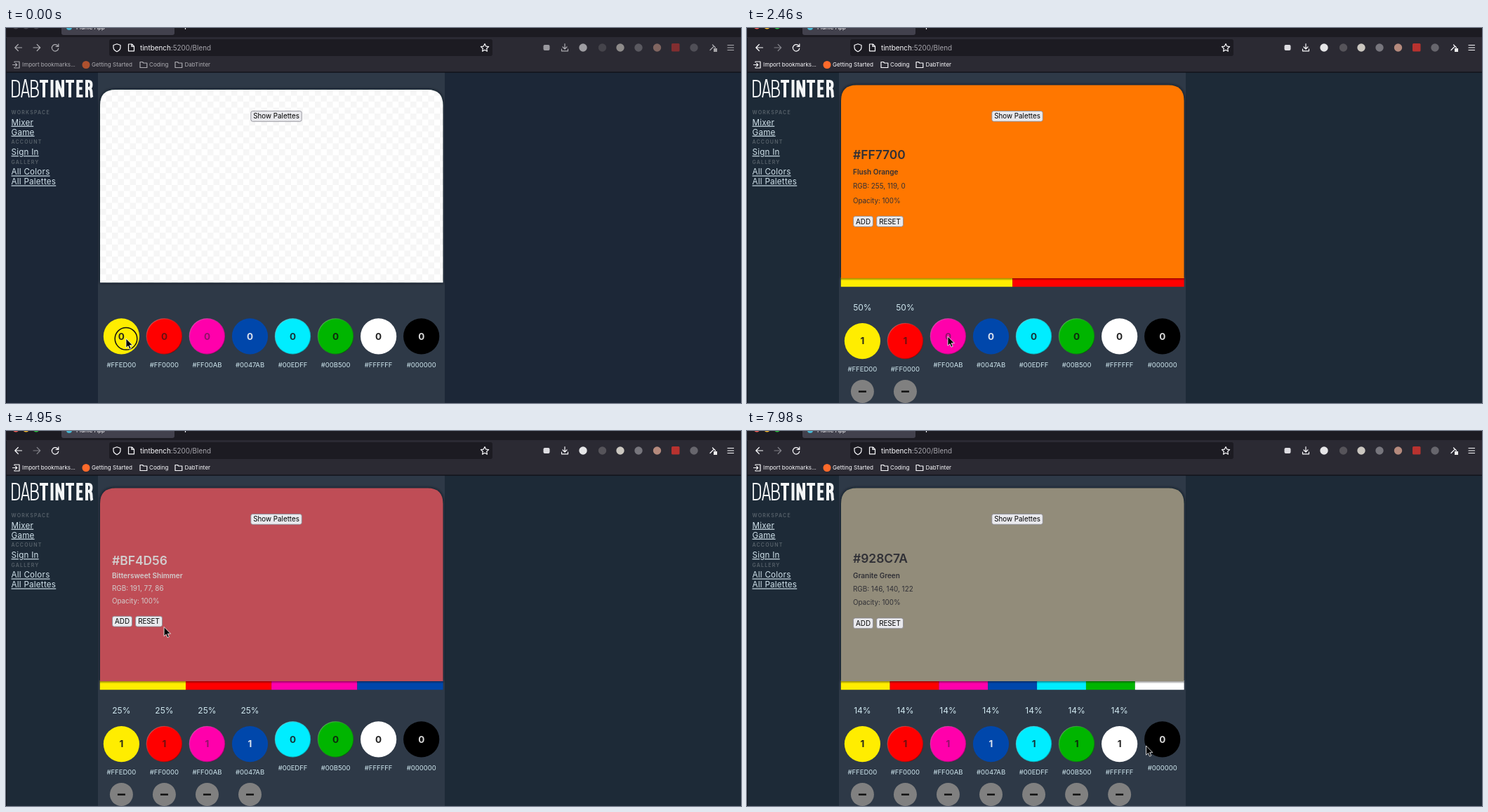
Animation, 1047 px wide and 535 px high, one loop 8 s. Source, as an HTML page:

```html
<!DOCTYPE html>
<html lang="en">
<head>
<meta charset="utf-8">
<title>Color mixer</title>
<style>
  html, body { margin: 0; width: 100%; height: 100%; overflow: hidden; background: #1d2a37; }
  svg { display: block; width: 1047px; height: 535px; font-family: Inter, "Open Sans", sans-serif; }
  .line { fill: none; stroke: #fbfbfe; stroke-width: 1.2; stroke-linecap: round; stroke-linejoin: round; }
  .link { text-decoration: underline; text-decoration-thickness: 1px; text-underline-offset: 2px; letter-spacing: .25px; }
</style>
</head>
<body>
<svg id="stage" viewBox="0 0 1047 535">
  <defs>
    <pattern id="checks" x="134" y="88" width="17" height="17" patternUnits="userSpaceOnUse">
      <path fill="#fff" d="M0 0h17v17H0z"/>
      <path fill="#f6f6f6" d="M0 0h8.5v8.5H0zM8.5 8.5h8.5v8.5H8.5z"/>
    </pattern>
    <linearGradient id="rim" x1="0" y1="0" x2="1" y2="1">
      <stop offset=".1" stop-color="#bbb" stop-opacity=".4"/>
      <stop offset=".5" stop-color="#555" stop-opacity=".2"/>
      <stop offset=".9" stop-color="#000" stop-opacity=".35"/>
    </linearGradient>
    <linearGradient id="shade" x1="0" y1="0" x2="0" y2="1">
      <stop offset="0" stop-opacity=".4"/>
      <stop offset="1" stop-opacity="0"/>
    </linearGradient>
    <filter id="soft" x="-5%" y="-5%" width="110%" height="110%">
      <feGaussianBlur stdDeviation="2"/>
    </filter>
  </defs>
  <rect id="page" y="63" width="1047" height="472"/>
  <path fill="#2e3947" d="M131 63h494v472H131z"/>
  <g id="chrome"></g>
  <g id="side"></g>
  <g id="mixer"></g>
  <circle id="ring" cx="171" cy="443.3" r="15.8" fill="none" stroke="#111" stroke-width="1.5"/>
  <g id="pointer">
    <path id="arrow" d="M0 0V13.2L3 10.6 5 15.2 7.2 14.2 5.2 9.7H9.4Z" fill="#000" stroke="#fff" stroke-width=".8"/>
    <path id="beam" d="M1 0q2.5 0 3 1.5.5-1.5 3-1.5M4 1.5v9M1 12q2.5 0 3-1.5.5 1.5 3 1.5M2.5 6.5h3" fill="none" stroke="#eee" stroke-width="1.2"/>
  </g>
</svg>
<script>
const LOOP = 8000;
const $ = id => document.getElementById(id);

const colors = ['FFED00', 'FF0000', 'FF00AB', '0047AB', '00EDFF', '00B500', 'FFFFFF', '000000'];
const digits = ['#2b2a18', '#6b1010', '#8f1268', '#dce3ee', '#16343a', '#0d2b0d', '#222', '#d8d8d8'];

// time, number of colors in the mix, palette already stored
const mixes = [
  [0, 0], [390, 1], [1710, 2], [2550, 3], [3270, 4], [5190, 4, true],
  [6210, 5], [7050, 6], [7620, 7]
];

// time, color name, row centers: hex, name, rgb, opacity, buttons
const names = [
  [0, 'Turbo', 180.5, 205, 225.5, 246, 276],
  [1950, 'Flush Orange', 180.5, 205, 225.5, 246, 276],
  [2790, 'Sunset Orange', 180.5, 205.5, 225.5, 245.5, 275.5],
  [3510, 'Bittersweet Shimmer', 184.5, 206.5, 224.3, 242, 271.7],
  [6450, 'Bazaar', 181.5, 206, 225.3, 244.5, 274.4],
  [7290, 'Pablo', 181.7, 206, 225.2, 244.3, 274.3],
  [7860, 'Granite Green', 182, 206, 225.2, 244.2, 274.3]
];

// time, x, y of the pointer tip
const path = [
  [0, 171, 443], [600, 171, 443], [1050, 226, 440], [1170, 226, 440], [1500, 226, 437],
  [1980, 226, 437], [2400, 286, 440], [2790, 286, 440], [3210, 342, 435], [3510, 342, 435],
  [3690, 398, 162], [3900, 401.5, 191.5], [4140, 460, 486], [4290, 453, 472], [4320, 453, 472],
  [4710, 229, 280], [4920, 229, 280], [5130, 163, 272], [5580, 163, 271], [5700, 389.5, 425],
  [6000, 389.5, 425], [6150, 407, 438], [6450, 407, 438], [6810, 460.5, 447],
  [7290, 460.5, 447], [7560, 528, 440], [7700, 528, 440], [7950, 568.5, 449], [8000, 568.5, 449]
];

const label = (x, cy, size, text, fill = '#fbfbfe', extra = '') =>
  `<text x="${x}" y="${cy + size * .36}" font-size="${size}" fill="${fill}" ${extra}>${text}</text>`;
const mid = 'text-anchor="middle"';
const rect = (x, y, w, h, fill, r = 0, extra = '') =>
  `<rect x="${x}" y="${y}" width="${w}" height="${h}" rx="${r}" fill="${fill}" ${extra}/>`;
const dot = (x, y, r, fill, extra = '') => `<circle cx="${x}" cy="${y}" r="${r}" fill="${fill}" ${extra}/>`;
const line = (d, extra = '') => `<path class="line" d="${d}" ${extra}/>`;
const button = (x, cy, w, text, opacity = 1) =>
  `<g opacity="${opacity}">` +
  rect(x + .5, cy - 7.4, w - 1, 14.8, '#e9e9ed', 2.8, 'stroke="#85858f" stroke-width=".8"') +
  label(x + w / 2, cy, 9.8, text, '#000', mid) + '</g>';

const at = (table, t) => table.findLast(row => row[0] <= t);

function drawChrome(active) {
  const dim = active ? 1 : .62;
  const folder = x => line(`M${x} 48.5h3.5l1.3 1.5h5v6.5h-9.8z`, 'stroke-width="1"');
  const addons = [
    [822, '#e6e6e8'], [849.5, '#56545a'], [875, '#cbc7c0'], [901, '#77767d'],
    [927.5, '#b58a7d'], [980, '#67666d']
  ];
  $('page').setAttribute('fill', active ? '#1d2a37' : '#1c2737');
  $('chrome').innerHTML =
    rect(0, 0, 1047, 14, '#1c1b22') + rect(0, 13, 1047, 50, '#2b2a33') +
    rect(79, -8, 161, 18, '#42414d', 3) +
    (active
      ? dot(14, -3, 4.6, '#ff5f57') + dot(28.5, -3, 4.6, '#febc2e') + dot(43, -3, 4.6, '#28c840')
      : [14, 28.5, 43].map(x => dot(x, -3, 4.6, '#44434a')).join('')) +
    dot(90, -1, 4, '#46b7d2') +
    label(100, -.9, 8, 'Plume App') + line('M253 -1h5M255.5 -4v5.5') +
    rect(147, 16, 546, 24, '#1c1b22', 3) +
    line('M158 22.8l5 1.7v3q0 4-5 6.3-5-2.3-5-6.3v-3z') +
    line('M174.5 23h4.8l3.2 3.2v6.6h-8zM179 23v3.5h3.5') +
    line('M682 22.6l1.7 3.5 3.9.5-2.9 2.7.7 3.9-3.4-1.9-3.4 1.9.7-3.9-2.9-2.7 3.9-.5z') +
    label(191, 28, 9.9, 'tintbench<tspan fill="#a5a4ab">:5200/Blend</tspan>') +
    `<g opacity="${dim}">` +
    line('M22.5 28h-9.5M17.3 23.5l-4.5 4.5 4.5 4.5') +
    line('M39 28h9.5M44.2 23.5l4.5 4.5-4.5 4.5', active ? 'opacity=".42"' : '') +
    line('M74.3 26.3a4.7 4.7 0 1 0 .4 2.8M74.8 22.8v3.6h-3.6') +
    rect(765.5, 24, 9, 8, '#dedde2', 2) +
    line('M796 22.5v7M793 27l3 3 3-3M791.5 30v2.8h9v-2.8') +
    addons.map(([x, fill]) => dot(x, 28, 5.7, fill)).join('') +
    rect(948, 22, 11.5, 11.5, '#b8322f', 1.5) +
    line('M1003 31.5l5.5-5.5M1006.5 24l4 4', 'stroke-width="2"') + rect(1008, 29, 5, 5, '#eee') +
    line('M1028 24.5h8.5M1028 28h8.5M1028 31.5h8.5') +
    line('M12 49v-1h7v9h-7v-1M9.5 52.5h6M13.7 50.5l2 2-2 2', 'stroke-width="1"') +
    label(23, 52.5, 8, 'Import bookmarks...') +
    dot(114, 52.5, 5.5, '#ff6a2b') + label(122, 52.5, 8.1, 'Getting Started') +
    folder(191) + label(204, 52.5, 8.1, 'Coding') +
    folder(241) + label(254.5, 52.5, 8, 'DabTinter') +
    '</g>' + rect(0, 62.5, 1047, 1.2, '#0d0e14') + rect(0, 14, .8, 521, '#11131a');
}

function drawSide() {
  const link = (cy, text) => label(7.5, cy, 11.6, text, '#d2e3ec', 'class="link"');
  const head = (cy, text) => label(7.5, cy, 7, text, '#57616a', 'font-weight="600" letter-spacing="1.2"');
  const stroke = (w, d) => `<path d="${d}" fill="none" stroke="#f3f5f6" stroke-width="${w}"/>`;
  $('side').innerHTML =
    '<g role="img" aria-label="DabTinter">' +
    stroke(1.8, 'M9 75h4q6 0 6 6v11q0 6-6 6h-4zM22 99l5-25h1l5 25M23.5 92h8M36 75h4q5 0 5 6 0 5-5 5h-4 4q6 0 6 6 0 6-6 6h-4z') +
    stroke(4, 'M48 76h12M54 76v23M65.5 74v25M72.5 99V75l8.5 23V74M85 76h12M91 76v23M109.5 76h-7.2v21h7.2M102 86.3h6.5M115 99V76h2.5q4 0 4 5t-4 5H115M118 86q3.5 1 3.5 6 0 5 1 7') +
    '</g>' +
    head(120.5, 'WORKSPACE') + link(134.5, 'Mixer') + link(148.5, 'Game') +
    head(162.7, 'ACCOUNT') + link(177, 'Sign In') +
    head(191, 'GALLERY') + link(205.3, 'All Colors') + link(219.3, 'All Palettes');
}

// Plain average of the first n colors
function blend(n) {
  return [0, 2, 4].map(i => {
    let sum = 0;
    for (const c of colors.slice(0, n)) sum += parseInt(c.slice(i, i + 2), 16);
    return Math.round(sum / n);
  });
}

function drawInfo(rgb, hex, added, [, name, ...rows]) {
  const luma = rgb[0] * .299 + rgb[1] * .587 + rgb[2] * .114;
  const ink = luma > 126 ? '#303036' : '#d2cdcd';
  const [first, gap] = added ? [42, 46] : [29, 33];
  return label(151, rows[0], 17.4, hex, ink, 'font-weight="600"') +
    label(151, rows[1], 10, name, ink, 'font-weight="600"') +
    label(151, rows[2], 9.9, 'RGB: ' + rgb.join(', '), ink) +
    label(151, rows[3], 9.8, 'Opacity: 100%', ink) +
    button(151, rows[4], first, added ? 'ADDED' : 'ADD', added ? .4 : 1) +
    button(151 + gap, rows[4], 39, 'RESET');
}

function drawBall(i, n) {
  const x = 164.4 + i * 61.04, on = i < n, y = on ? 446.6 : 439.9;
  const bevel = [1, 2, 4, 5].includes(i);
  return dot(x, y, 25.6, '#' + colors[i]) +
    (bevel ? dot(x, y, 25.2, 'none', 'stroke="url(#rim)" stroke-width="1.4"') : '') +
    label(x, y, 13.5, on ? 1 : 0, digits[i], mid + ' font-weight="700"') +
    label(x, y + 40.4, 9.5, '#' + colors[i], '#d0e8f0', mid) +
    (on ? label(x, 399, 12, Math.floor(100 / n) + '%', '#d0e8f0', mid) +
      dot(x, 518.5, 16.5, '#808080') + rect(x - 5.5, 517.4, 11, 2.5, '#111') : '');
}

function drawMixer([, n, added], info) {
  const top = n ? 81.5 : 88, low = n ? 357 : 363.3;
  const card = `M134 ${low}V${top + 22}q0-22 22-22h444.5q22 0 22 22V${low}z`;
  let fill = 'url(#checks)', text = '', bars = '';
  if (n) {
    const rgb = blend(n), w = 488.8 / n;
    const hex = '#' + rgb.map(v => v.toString(16).padStart(2, '0')).join('').toUpperCase();
    fill = hex;
    text = drawInfo(rgb, hex, added, info);
    for (let i = 0; i < n; i++) bars += rect(133.8 + i * w, 356, w, 13.2, '#' + colors[i]);
    bars += rect(133.8, 357, 488.8, 3.5, 'url(#shade)');
  }
  $('mixer').innerHTML =
    `<path d="${card}" fill="#10161f" filter="url(#soft)"/>` + bars +
    `<path d="${card}" fill="${fill}"/>` + text +
    button(348.3, 125.9, 73.5, 'Show Palettes') +
    colors.map((c, i) => drawBall(i, n)).join('');
}

function pointerAt(t) {
  const i = path.findIndex(p => p[0] > t);
  const [t0, x0, y0] = path[i - 1], [t1, x1, y1] = path[i];
  const k = (t - t0) / (t1 - t0), e = k * k * (3 - 2 * k);
  return [x0 + (x1 - x0) * e, y0 + (y1 - y0) * e];
}

let shownMix, shownName, shownActive;

function render(t) {
  const mix = at(mixes, t), name = at(names, t), active = t >= 90;
  if (active !== shownActive) drawChrome(shownActive = active);
  if (mix !== shownMix || name !== shownName) drawMixer(shownMix = mix, shownName = name);
  const [x, y] = pointerAt(t);
  $('pointer').setAttribute('transform', `translate(${x.toFixed(1)} ${y.toFixed(1)})`);
  const typing = t >= 3180 && t < 3510;
  $('arrow').setAttribute('visibility', typing ? 'hidden' : 'visible');
  $('beam').setAttribute('visibility', typing ? 'visible' : 'hidden');
  $('ring').setAttribute('opacity', Math.max(0, 1 - Math.max(0, t - 30) / 150));
}

const start = performance.now();
function tick() {
  render((performance.now() - start) % LOOP);
  requestAnimationFrame(tick);
}
drawSide();
tick();
</script>
</body>
</html>
```
